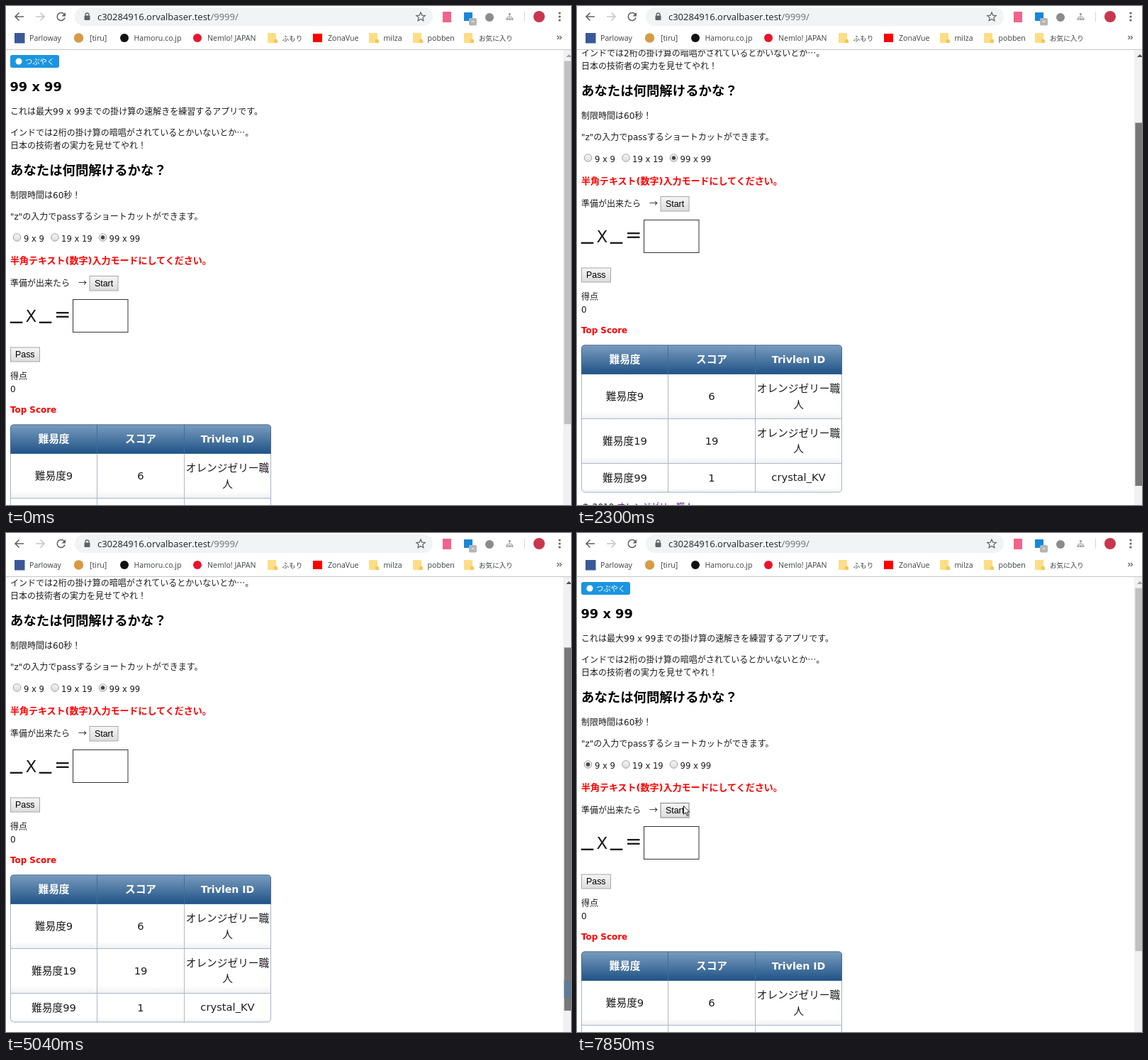
Write an HTML page that moves like this. It is 797 px wide and 703 px high and loops after 8 s.

```html
<!DOCTYPE html>
<html lang="ja">
<head>
<meta charset="utf-8">
<title>99 x 99</title>
<style>
  html, body { margin: 0; width: 100%; height: 100%; overflow: hidden; background: #fff; }
  svg { display: block; }
  text { font: 12px "DejaVu Sans", "Noto Sans CJK JP", "Noto Sans CJK", sans-serif; fill: #1c1c1c; white-space: pre; }
  .j { font-family: "Noto Sans CJK JP", "Noto Sans CJK", sans-serif; }
  .b, .head text { font-weight: bold; fill: #000; }
  .red { fill: #f00; font-size: 13px; }
  .h2 { font-size: 18.4px; }
  .btn text { font: 12.4px "Liberation Sans", Arial, sans-serif; fill: #000; }
  .btn rect { fill: url(#btn); stroke: #a6a6a6; }
  .radio circle { fill: url(#btn); stroke: #a3a3a3; }
  .label text { font-size: 11.6px; }
  .table text { font-size: 14.7px; text-anchor: middle; }
  .table .head text, .tweet { fill: #fff; }
  .bar text { font: 10.6px "Open Sans", "Noto Sans", "Noto Sans CJK JP", sans-serif; fill: #3c4043; }
  .bar .kana { font-size: 9.6px; }
  .bar .url { font-size: 13px; fill: #202124; }
</style>
</head>
<body>
<svg width="797" height="703" viewBox="0 0 797 703">
  <defs>
    <linearGradient id="btn" x2="0" y2="1"><stop stop-color="#f6f6f6"/><stop offset="1" stop-color="#dcdcdc"/></linearGradient>
    <linearGradient id="blue" x2="0" y2="1"><stop stop-color="#7a9dbf"/><stop offset="1" stop-color="#1f5286"/></linearGradient>
    <linearGradient id="cell" x2="0" y2="1"><stop offset=".84" stop-color="#fff"/><stop offset="1" stop-color="#efefef"/></linearGradient>
    <clipPath id="round"><rect x="6" y="589.5" width="368" height="208" rx="5"/></clipPath>
    <g id="folder"><path d="M1 0H11Q12 0 12 1V8L14 10V14H1Q0 14 0 13V1Q0 0 1 0Z" fill="#fddd86"/><path d="M9 14V9H12L14 10V14Z" fill="#f3c65a"/></g>
  </defs>

  <g id="page">
    <rect x="6" y="69" width="69" height="18" rx="3" fill="#1b95e0"/>
    <circle cx="18" cy="78" r="4.5" fill="#fff"/>
    <text x="27" y="81.5" class="tweet" style="font-size:10.3px;font-weight:500">つぶやく</text>
    <text x="5.5" y="120" class="b" style="font-size:17.8px">99 x 99</text>
    <text x="6" y="153">これは最大99 x 99までの掛け算の速解きを練習するアプリです。</text>
    <text x="6" y="182.5">インドでは2桁の掛け算の暗唱がされているとかいないとか<tspan class="j">…</tspan>。</text>
    <text x="6" y="200.5">日本の技術者の実力を見せてやれ！</text>
    <text x="6" y="238" class="b h2">あなたは何問解けるかな？</text>
    <text x="6" y="270.5">制限時間は60秒！</text>
    <text x="6" y="300.5">"z"の入力でpassするショートカットができます。</text>
    <g class="radio">
      <circle cx="15.5" cy="326" r="5.3"/><circle cx="69" cy="326" r="5.3"/><circle cx="136.5" cy="326" r="5.3"/>
    </g>
    <circle id="dot" cy="326" r="2.7" fill="#444"/>
    <g class="label">
      <text x="25" y="332">9 x 9</text><text x="78" y="332">19 x 19</text><text x="145.5" y="332">99 x 99</text>
    </g>
    <text x="6" y="362.5" class="b red">半角テキスト(数字)入力モードにしてください。</text>
    <text x="6" y="395" class="j">準備が出来たら　→</text>
    <g class="btn">
      <rect id="start" x="118" y="380.5" width="40" height="20.5"/><text x="125" y="395">Start</text>
      <rect x="6.5" y="481" width="41" height="20"/><text x="13" y="495">Pass</text>
    </g>
    <g>
      <text x="6" y="439" style="font-size:34px">_</text><text x="27.5" y="445" style="font-size:23px">X</text>
      <text x="47" y="439" style="font-size:34px">_</text><text x="68" y="444" style="font-size:28px">=</text>
    </g>
    <rect x="94.5" y="413.5" width="77.5" height="46" fill="#fff" stroke="#333"/>
    <text x="6" y="525.5">得点</text>
    <text x="6" y="543.5">0</text>
    <text x="6" y="573" class="b red" style="font-size:11.9px">Top Score</text>

    <g class="table">
      <g clip-path="url(#round)">
        <rect x="6" y="589.5" width="368" height="41.5" fill="url(#blue)"/>
        <g fill="url(#cell)">
          <rect x="6" y="631" width="368" height="63"/><rect x="6" y="694" width="368" height="62.5"/><rect x="6" y="756.5" width="368" height="41"/>
        </g>
        <path d="M6 693.5H374M6 756.5H374M128.5 631V798M251.5 631V798" stroke="#a9bac9"/>
        <path d="M128.5 589V631M251.5 589V631M6 630.5H374" stroke="#3f6d99"/>
      </g>
      <rect x="6.5" y="590" width="367" height="207" rx="5" fill="none" stroke="#a0b6cb"/>
      <path d="M6.5 631V595Q6.5 590 11 590H369Q373.5 590 373.5 595V631" fill="none" stroke="#42698f"/>
      <g class="head">
        <text x="67.5" y="615">難易度</text><text x="190" y="615">スコア</text><text x="312.5" y="615" style="font-size:14.1px">Trivlen ID</text>
      </g>
      <text x="67.5" y="667">難易度9</text><text x="190" y="667">6</text>
      <text x="312.5" y="656">オレンジゼリー職</text><text x="312.5" y="678.5">人</text>
      <text x="67.5" y="729.5">難易度19</text><text x="190" y="729.5">19</text>
      <text x="312.5" y="718.5">オレンジゼリー職</text><text x="312.5" y="741">人</text>
      <text x="67.5" y="781.5">難易度99</text><text x="190" y="781.5">1</text><text x="312.5" y="781">crystal_KV</text>
    </g>
    <text x="6" y="822">© 2019 <tspan fill="#551a8b" text-decoration="underline">オレンジゼリー職人</tspan></text>
    <text x="6" y="851.5" style="fill:#00c">▲Top</text>
  </g>

  <rect x="786" y="62" width="11" height="641" fill="#f1f1f1"/>
  <path id="up" d="M790 72L794 68L798 72Z"/>
  <rect id="thumb" x="787.4" width="12" height="511.5"/>
  <rect id="tint" x="787.4" y="630" width="10" height="25" fill="#5f7b95"/>

  <g class="bar">
    <rect width="797" height="62" fill="#fff"/>
    <path d="M0 61.5H797" stroke="#c6c6c6"/>
    <rect x="97" y="2" width="505" height="26" rx="13" fill="#f1f3f4"/>
    <g fill="none" stroke="#5f6368" stroke-width="1.6">
      <path d="M25 15H13.5M18.5 9.5L13 15L18.5 20.5"/>
      <path d="M42 15H53.5M48.5 9.5L54 15L48.5 20.5" stroke="#c4c6c9"/>
      <path d="M82 11.5A5.5 5.5 0 1 0 83 16.5"/>
      <path d="M112 14V12.5A2.5 2.5 0 0 1 117 12.5V14" stroke-width="1.3"/>
      <path d="M585 9L586.8 13.1L591.2 13.5L587.9 16.4L588.9 20.8L585 18.5L581.1 20.8L582.1 16.4L578.8 13.5L583.2 13.1Z" stroke-width="1.2"/>
      <path d="M777.5 42L780 44.5L777.5 47M781 42L783.5 44.5L781 47" stroke-width="1.2"/>
    </g>
    <path d="M84 9V14.5H78.5Z" fill="#5f6368"/>
    <rect x="110.5" y="13.5" width="8" height="6.5" rx="1" fill="#5f6368"/>
    <text x="129" y="20" class="url">c30284916.orvalbaser.test<tspan fill="#6a6e73">/9999/</tspan></text>

    <rect x="616" y="8" width="12" height="15" fill="#f0648c"/>
    <rect x="646" y="9" width="12" height="12" fill="#1a86d8"/>
    <rect x="653" y="17" width="11" height="10.5" rx="2" fill="#b5b5b5"/>
    <path d="M656.5 22H660.5" stroke="#fff"/>
    <circle cx="682" cy="16" r="6" fill="#8b8b8b"/>
    <path d="M710.5 13V15.5M707 18V15.5H714V18" fill="none" stroke="#aaa"/>
    <path d="M709 10H712V13H709ZM705.5 17H708.5V20H705.5ZM709 17H712V20H709ZM712.5 17H715.5V20H712.5Z" fill="#aaa"/>
    <path d="M731.5 8V22" stroke="#d5d7da"/>
    <circle cx="752" cy="15" r="8" fill="#c8374f"/>
    <g fill="#5f6368"><circle cx="781" cy="10" r="1.6"/><circle cx="781" cy="15" r="1.6"/><circle cx="781" cy="20" r="1.6"/></g>

    <rect x="12" y="38" width="14.5" height="14.5" fill="#3b5998"/>
    <text x="33" y="49">Parloway</text>
    <circle cx="102.5" cy="45" r="6.7" fill="#d79a45"/>
    <text x="118" y="49">[tiru]</text>
    <circle cx="167" cy="45" r="6" fill="#111"/>
    <text x="180.5" y="49">Hamoru.co.jp</text>
    <circle cx="270" cy="45" r="6" fill="#e8142d"/>
    <text x="284" y="49">Nemlo! JAPAN</text>
    <use href="#folder" x="369" y="38"/>
    <text x="389.5" y="48.5" class="kana">ふもり</text>
    <rect x="433" y="39" width="13" height="12" fill="#f00"/>
    <text x="454" y="49">ZonaVue</text>
    <use href="#folder" x="512" y="38"/>
    <text x="532.5" y="49">milza</text>
    <use href="#folder" x="574" y="38"/>
    <text x="594.5" y="49">pobben</text>
    <use href="#folder" x="646" y="38"/>
    <text x="667" y="48.5" class="kana">お気に入り</text>
  </g>

  <path id="cursor" d="M.5 .5V12.3L3.2 9.8L5.2 14.5L7 13.7L5 9.2H8.7Z" fill="#fff" stroke="#111" stroke-width=".9"/>
</svg>
<script>
const LOOP = 8000;
const el = id => document.getElementById(id);
const [page, thumb, tint, up, dot, start, cursor] =
  ['page', 'thumb', 'tint', 'up', 'dot', 'start', 'cursor'].map(el);

// Each move: start ms, end ms, number of held poses, points spread evenly along it
const pointer = [
  [0, 1, 2, [[-50, 0], [-50, 0]]],
  [350, 1140, 11, [[444, 535], [470, 500], [560, 385], [660, 250], [716, 182]]],
  [1210, 1370, 3, [[746, 150], [775, 122], [794, 104]]],
  [1920, 2000, 2, [[795, 106], [802, 112]]],
  [5420, 5660, 4, [[776, 50], [774, 42]]],
  [5730, 6500, 11, [[745, 52], [590, 130], [340, 290], [130, 394], [31, 345], [60, 317]]],
  [6750, 7300, 8, [[52, 316], [25, 312], [8, 314], [10, 317]]],
  [7470, 7530, 2, [[10, 318], [18, 333]]],
  [7700, 7850, 3, [[60, 352], [120, 376], [150, 384]]],
];
const scrolling = [
  [0, 1, 2, [[0], [0]]],
  [1920, 2450, 8, [[0], [8], [28], [52], [82], [112], [134], [145]]],
  [4870, 5660, 11, [[138.5], [126], [108], [86], [62], [38], [14], [0], [0], [0], [0]]],
];

function pose(moves, t) {
  const [t0, t1, n, pts] = moves.filter(m => m[0] <= t).pop();
  const held = Math.min(n - 1, Math.floor((t - t0) / (t1 - t0) * (n - 1) + .16));
  const at = held / (n - 1) * (pts.length - 1);
  const i = Math.min(Math.floor(at + 1e-6), pts.length - 2);
  return pts[i].map((a, k) => a + (pts[i + 1][k] - a) * (at - i));
}

function draw() {
  const t = performance.now() % LOOP;
  const [y] = pose(scrolling, t);
  const dragging = t >= 1920 && t < 5410;
  page.setAttribute('transform', `translate(0 ${-y})`);
  thumb.setAttribute('y', 77.6 + y * .776);
  thumb.setAttribute('fill', dragging ? '#787878' : t >= 1370 && t < 1920 ? '#a8a8a8' : '#c1c1c1');
  tint.style.display = dragging && t >= 2450 ? '' : 'none';
  up.setAttribute('fill', y ? '#505050' : '#a3a3a3');
  dot.setAttribute('cx', t < 7470 ? 136.5 : 15.5);
  start.style.stroke = t >= 7770 ? '#808080' : '';
  cursor.setAttribute('transform', `translate(${pose(pointer, t).map(Math.round)})`);
  requestAnimationFrame(draw);
}
draw();
</script>
</body>
</html>
```
